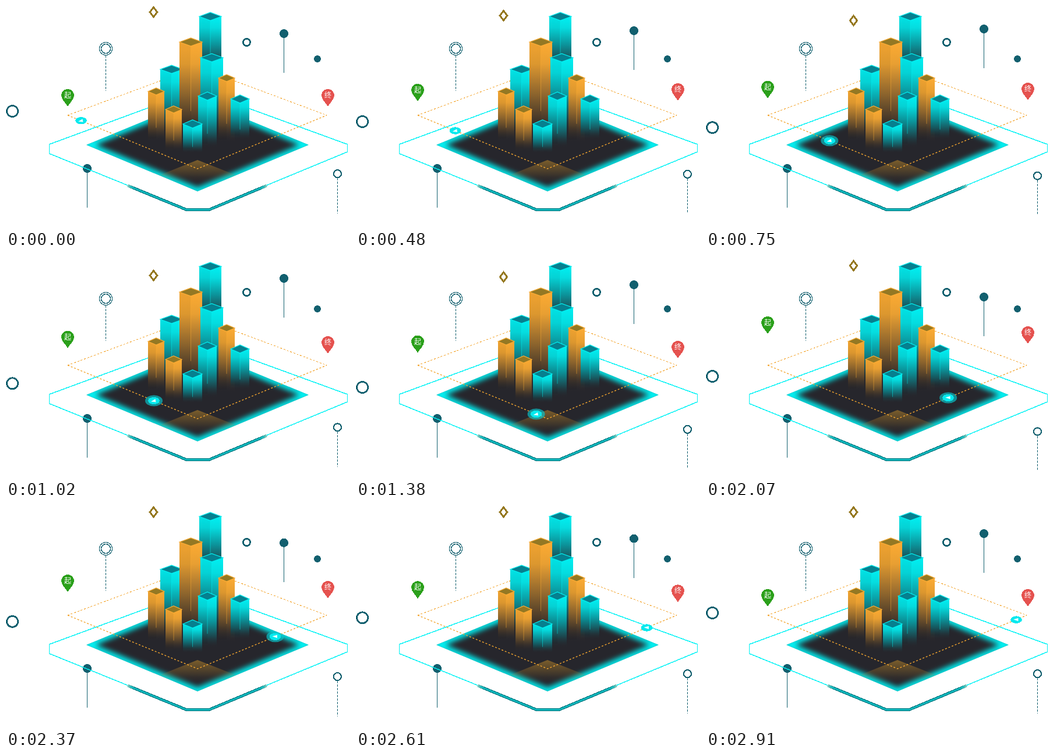
Write an HTML page that moves like this. It is 591x382 px and loops after 2970 ms.

```html
<!DOCTYPE html>
<html lang="zh">
<head>
<meta charset="utf-8">
<title>Isometric city route</title>
<style>
  html, body { margin: 0; width: 100%; height: 100%; overflow: hidden; background: #fff; }
  svg { display: block; }
  text { font: 12px "Noto Sans CJK SC", "Noto Sans CJK", sans-serif; fill: #fff; text-anchor: middle; }
  .crisp { shape-rendering: crispEdges; }
</style>
</head>
<body>
<svg id="stage" width="591" height="382" viewBox="0 0 591 382">
  <defs>
    <linearGradient id="cyan" x2="0" y2="1">
      <stop offset="0" stop-color="#00f0f2"/>
      <stop offset=".2" stop-color="#05dcdf"/>
      <stop offset=".5" stop-color="#0c9299"/>
      <stop offset=".78" stop-color="#1c474e"/>
      <stop offset="1" stop-color="#26262c" stop-opacity="0"/>
    </linearGradient>
    <linearGradient id="orange" x2="0" y2="1">
      <stop offset="0" stop-color="#fcab33"/>
      <stop offset=".22" stop-color="#e89f32"/>
      <stop offset=".5" stop-color="#9a6d2f"/>
      <stop offset=".78" stop-color="#45382b"/>
      <stop offset="1" stop-color="#26262c" stop-opacity="0"/>
    </linearGradient>
    <linearGradient id="amber" x2="0" y2="1">
      <stop offset="0" stop-color="#b5832a" stop-opacity=".6"/>
      <stop offset=".55" stop-color="#b5832a" stop-opacity=".08"/>
      <stop offset=".7" stop-color="#b5832a" stop-opacity="0"/>
    </linearGradient>
    <linearGradient id="bar" gradientUnits="userSpaceOnUse" x1="209" x2="448">
      <stop offset="0" stop-color="#7fd0c4"/>
      <stop offset=".05" stop-color="#057f87"/>
      <stop offset=".95" stop-color="#057f87"/>
      <stop offset="1" stop-color="#7fd0c4"/>
    </linearGradient>
    <filter id="blur" x="-20%" y="-20%" width="140%" height="140%"><feGaussianBlur stdDeviation="5"/></filter>
    <path id="tile" d="M138 239L329 160L520 239L329 319Z"/>
    <clipPath id="tileClip"><use href="#tile"/></clipPath>
  </defs>

  <g class="crisp" fill="none" stroke="#12606f">
    <circle cx="413.5" cy="62.5" r="6" stroke-width="2.8"/>
    <circle cx="535" cy="91" r="6" fill="#12606f" stroke="none"/>
    <circle cx="171.5" cy="73.5" r="11"/>
    <circle cx="171.5" cy="73.5" r="8" stroke-width="1.4"/>
    <path d="M171.5 85V146" stroke-dasharray="4 2"/>
    <circle cx="139.5" cy="279.5" r="7.5" fill="#12606f" stroke="none"/>
    <path d="M139.5 287V347"/>
    <circle id="ring" cx="11" r="9.5" stroke-width="2.8"/>
    <path id="diamond" d="M0-8.3L6.2 0L0 8.3L-6.2 0Z" stroke="#95781f" stroke-width="3"/>
    <g id="lollipop">
      <circle r="7.5" fill="#12606f" stroke="none"/>
      <path d="M0 7V67.5"/>
    </g>
    <g id="hoop">
      <circle r="6.5" stroke-width="2.2"/>
      <path d="M0 7.5V68" stroke-dasharray="4 2"/>
    </g>
  </g>

  <path class="crisp" d="M74.5 238L329 144L586.5 238V251L349 349.5H310L74.5 254Z" fill="none" stroke="#00f3f5" stroke-width="1.5"/>
  <g fill="none">
    <path class="crisp" d="M209 309L310 350.5H349L448 309" stroke="url(#bar)" stroke-width="5"/>
    <path d="M213 310.6L310 350.5H349L444 310.6" stroke="#14c9cd" stroke-width="1.8"/>
  </g>
  <path class="crisp" d="M106 188L329 105L551 188" fill="none" stroke="#f3a52e" stroke-dasharray="3 3"/>

  <g clip-path="url(#tileClip)">
    <use href="#tile" fill="#26262c"/>
    <use href="#tile" fill="none" stroke="#00f6f8" stroke-width="12" filter="url(#blur)"/>
    <path d="M329 265L395 291L329 319L264 291Z" fill="url(#amber)"/>
  </g>

  <g id="towers"></g>
  <path d="M106 188L329 280L551 188" fill="none" stroke="#f3a52e" stroke-width="1.4" stroke-dasharray="3 3"/>

  <g clip-path="url(#tileClip)"><ellipse id="halo" rx="15" ry="9.5" fill="#08c8ce" fill-opacity=".65"/></g>
  <g id="marker">
    <ellipse class="crisp" rx="9.8" ry="6.2" fill="#06e9ee"/>
    <path id="arrow" fill="#e9ffff"/>
  </g>

  <g id="startPin">
    <path class="crisp" d="M0 30C-3 24-11 18-11 11A11 11 0 0 1 11 11C11 18 3 24 0 30Z" fill="#2ba01b"/>
    <text y="15">起</text>
  </g>
  <g id="endPin">
    <path class="crisp" d="M0 30C-3 24-11 18-11 11A11 11 0 0 1 11 11C11 18 3 24 0 30Z" fill="#e5524f"/>
    <text y="15">终</text>
  </g>
</svg>
<script>
const LOOP = 2970, STEP = 30, LAST = 2910;
const $ = id => document.getElementById(id);

// Back to front: hue, centre x, roof centre y, half width, half depth, foot y
const towers = [
  ["cyan", 351, 18, 19, 7, 116],
  ["cyan", 284.5, 109, 19.5, 7, 222],
  ["orange", 317.5, 62, 19.5, 7, 234],
  ["cyan", 353.5, 89, 19.5, 7, 222],
  ["orange", 379, 124, 14, 6, 236],
  ["cyan", 402, 160, 16, 7, 230],
  ["orange", 258, 147, 14, 6, 234],
  ["orange", 288, 178, 14, 6, 251],
  ["cyan", 346, 155, 16, 7, 244],
  ["cyan", 320.5, 203, 16.5, 7, 253]
];
const roofs = { cyan: ["#06808f", "#00f0f2"], orange: ["#947823", "#fbab33"] };

function tower([hue, x, y, w, d, foot]) {
  const [roof, rim] = roofs[hue];
  const l = x - w, r = x + w;
  return `<path d="M${l} ${y}L${x} ${y + d}L${r} ${y}V${foot}H${l}Z" fill="url(#${hue})"/>
    <path d="M${l} ${y}L${x} ${y + d}V${foot - d}H${l}Z" opacity=".05"/>
    <rect x="${x - .5}" y="${y + d}" width="1" height="${(foot - y) * .65}" fill="${rim}" opacity=".5"/>
    <path d="M${l} ${y}L${x} ${y - d}L${r} ${y}L${x} ${y + d}Z" fill="${roof}" stroke="${rim}" stroke-width="1.2"/>`;
}
$("towers").innerHTML = towers.map(tower).join("");

// Linear motion through [time, value] keys
function track(keys, t) {
  let i = 1;
  while (i < keys.length - 1 && t > keys[i][0]) i++;
  const [t0, v0] = keys[i - 1], [t1, v1] = keys[i];
  const p = Math.min(1, Math.max(0, (t - t0) / (t1 - t0)));
  return v0 + (v1 - v0) * p;
}

const bobs = {
  ring: [0, [[0, 181], [1276, 228.9], [2970, 182.4]]],
  diamond: [253.5, [[290, 10.5], [1231, 40.2], [2290, 10.5]]],
  lollipop: [477.5, [[0, 47.5], [980, 37.2], [2100, 71.4], [2900, 47.5]]],
  hoop: [569.5, [[400, 288.7], [1990, 304.3], [2540, 288.7]]],
  startPin: [106, [[0, 143], [900, 126], [1400, 137], [2070, 104], [2900, 143]]],
  endPin: [553, [[0, 143], [640, 129.6], [1400, 146.5], [1865, 115.8], [2900, 143]]]
};
const route = [[210, 129], [2827, 533]];

const place = (id, x, y) => $(id).setAttribute("transform", `translate(${x} ${y})`);

function draw(t) {
  for (const [id, [x, keys]] of Object.entries(bobs)) place(id, x, track(keys, t));
  const x = track(route, t);
  const y = 280 - Math.abs(x - 329) * 92 / 222.5;
  place("marker", x, y);
  place("halo", x, y);
  $("arrow").setAttribute("d", x < 329 ? "M-5 1.5L2.5-3L3.5 2.5Z" : "M-5-.5L3.5-3V2.5Z");
}

const begin = performance.now();
function tick() {
  const t = (performance.now() - begin) % LOOP;
  draw(Math.min(LAST, Math.floor(t / STEP) * STEP));
  requestAnimationFrame(tick);
}
tick();
</script>
</body>
</html>
```
